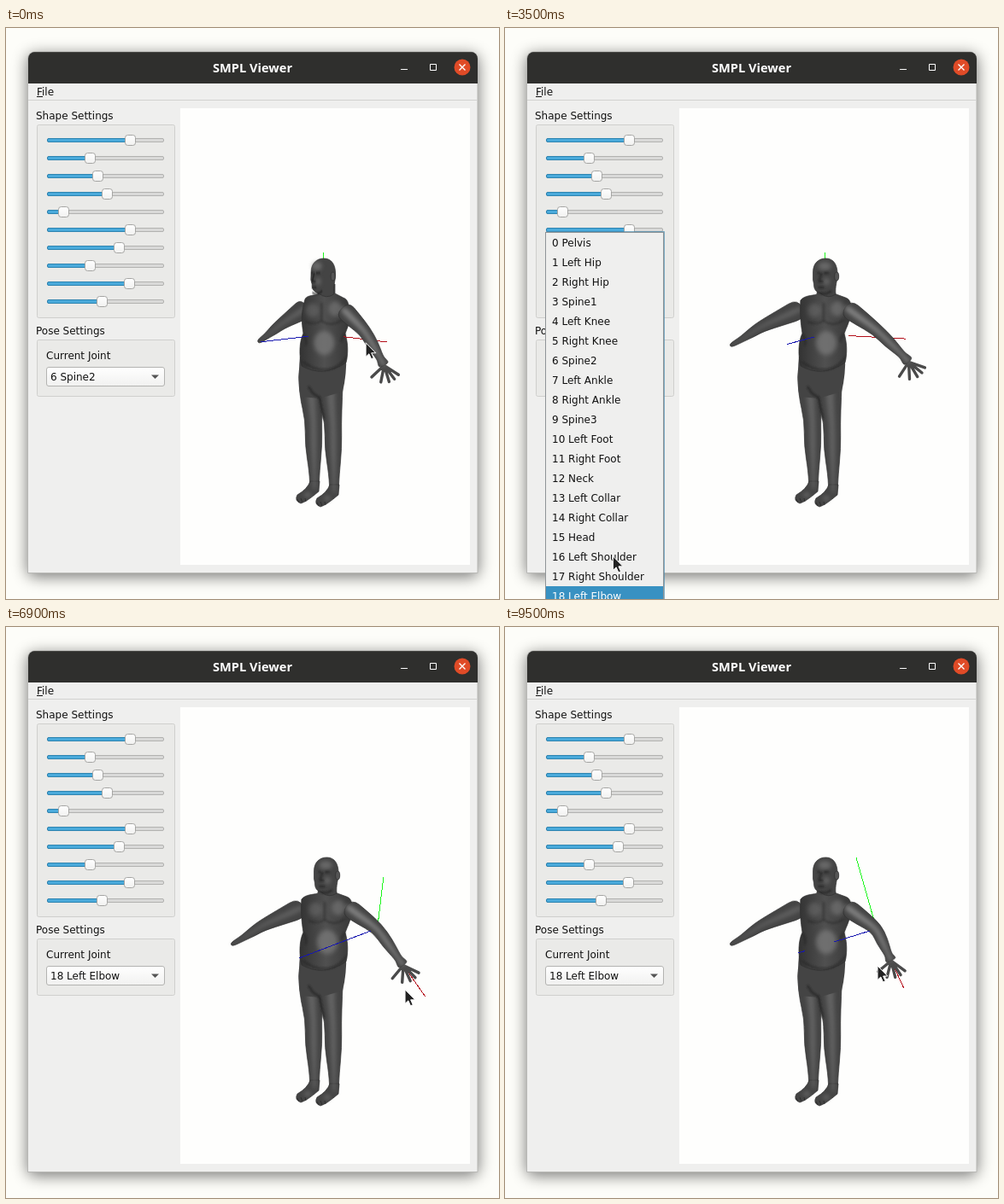
Animation, 577 px wide and 669 px high, one loop 9600 ms. Source, as an HTML page:

```html
<!DOCTYPE html>
<html lang="en">
<head>
<meta charset="utf-8">
<title>SMPL Viewer</title>
<style>
  html, body { margin: 0; width: 100%; height: 100%; overflow: hidden; background: #fdfdf9; }
  svg { display: block; }
  text { font: 12px "DejaVu Sans", sans-serif; fill: #111; white-space: pre; }
  .title { font: bold 14.6px "Noto Sans", sans-serif; fill: #fff; text-anchor: middle; }
  .box { fill: #eaeae8; stroke: #cfcfcd; }
  .axis { fill: none; shape-rendering: crispEdges; }
  .skin { fill: #444; stroke: #303030; stroke-width: .7; stroke-linejoin: round; }
  .light { fill: #808080; filter: url(#soft); }
  .dark { fill: none; stroke: #262626; stroke-width: 2; filter: url(#fine); }
  .fingers { fill: none; stroke: #4a4a4a; stroke-width: 3.4; stroke-linecap: round; }
</style>
</head>
<body>
<svg width="577" height="669" viewBox="0 0 577 669">
  <defs>
    <filter id="shadow" x="-10%" y="-10%" width="120%" height="120%"><feGaussianBlur stdDeviation="9"/></filter>
    <filter id="soft" x="-60%" y="-60%" width="220%" height="220%"><feGaussianBlur stdDeviation="2.6"/></filter>
    <filter id="fine" x="-40%" y="-40%" width="180%" height="180%"><feGaussianBlur stdDeviation=".9"/></filter>
    <linearGradient id="button" x2="0" y2="1"><stop stop-color="#fff"/><stop offset="1" stop-color="#f1f1f0"/></linearGradient>
    <linearGradient id="torsoFill"><stop stop-color="#333"/><stop offset=".5" stop-color="#505050"/><stop offset="1" stop-color="#383838"/></linearGradient>
  </defs>

  <rect width="577" height="669" fill="#fdfdf9"/>
  <rect x="25" y="31" width="528" height="612" rx="8" fill="#000" opacity=".52" filter="url(#shadow)"/>
  <path d="M25.5 638.5V36a8 8 0 0 1 8-8H544a8 8 0 0 1 8 8V638.5Z" fill="#efefee" stroke="#b8b8b5"/>
  <path d="M26 65V36a8 8 0 0 1 8-8H544a8 8 0 0 1 8 8V65Z" fill="#2f2f2d"/>
  <path d="M33 28.5H545" stroke="#464643"/>
  <text class="title" x="288.5" y="52">SMPL Viewer</text>
  <path d="M462 48.5H470M496.5 42.5H503.5V49.5H496.5Z" fill="none" stroke="#fff"/>
  <circle cx="534" cy="46" r="9.5" fill="#e04b27"/>
  <path d="M530.5 42.5L537.5 49.5M537.5 42.5L530.5 49.5" stroke="#fff" stroke-width="1.4"/>
  <text x="36" y="79">File</text>
  <path d="M36 80.5H43" stroke="#111"/>
  <path d="M26 84.5H552" stroke="#d2d2d0"/>
  <rect x="204" y="94" width="339" height="535" fill="#fefefd"/>

  <text x="35" y="107">Shape Settings</text>
  <rect class="box" x="36.5" y="113.5" width="161" height="226" rx="2"/>
  <g id="sliders"></g>
  <text x="35" y="359">Pose Settings</text>
  <rect class="box" x="36.5" y="365.5" width="161" height="66" rx="2"/>
  <text x="47" y="388">Current Joint</text>
  <rect x="47.5" y="397.5" width="138" height="22" rx="2.5" fill="url(#button)" stroke="#b3b3b1"/>
  <text id="joint" x="52" y="413"></text>
  <path d="M170 406.5H179L174.5 411Z" fill="#555"/>

  <path id="green" class="axis" stroke="#1cf51c"/>
  <path id="rightArm" class="skin"/>
  <path id="rightShine" class="light" opacity=".45"/>
  <g id="legs"></g>
  <path class="skin" stroke="none" style="stroke:none" d="M344 385Q341 420 345 432L367 434L394 426Q399 405 398 385Z"/>
  <path class="dark" d="M354 420Q359 429 367 433Q370 448 372 458"/>

  <path id="torso" class="skin" style="fill:url(#torsoFill)"/>
  <g id="chest">
    <g class="light">
      <ellipse cx="376" cy="369" rx="12" ry="14" opacity=".65"/>
      <ellipse cx="362" cy="331" rx="8" ry="8" opacity=".35"/>
      <ellipse cx="389" cy="329" rx="8" ry="9" opacity=".55"/>
    </g>
    <path class="dark" opacity=".55" d="M354 344Q364 349 373 343Q384 351 397 342M373 322V343"/>
  </g>
  <path class="dark" opacity=".7" d="M347 391Q366 405 384 398Q394 394 398 386M348 359Q353 365 351 372M397 358Q392 363 393 368"/>

  <path id="head" class="skin"/>
  <g id="face">
    <ellipse class="light" cx="4" cy="279" rx="8" ry="5" opacity=".6"/>
    <ellipse class="light" cx="6" cy="297" rx="4" ry="4" opacity=".55"/>
    <path class="dark" d="M-5 287H-2M3 287H9M-4 304H3M0 287L-3 297H2M-3 310Q4 314 12 308"/>
  </g>
  <ellipse id="ear" cy="291" rx="2.5" ry="5" fill="#555" stroke="#303030" stroke-width=".8"/>

  <path id="red" class="axis" stroke="#b30d18"/>
  <path id="fingers" class="fingers"/>
  <path id="leftArm" class="skin"/>
  <path id="leftShine" class="light"/>
  <path id="blue" class="axis" stroke="#1717b0"/>

  <g id="popup">
    <rect x="47.5" y="239.5" width="138" height="440" fill="#efefee" stroke="#8f9497"/>
    <path d="M48 238.5H186.5V669" fill="none" stroke="#4c8fb3" opacity=".7"/>
    <rect id="marker" x="48" width="137" height="23" fill="#3891c2"/>
    <g id="items"></g>
  </g>
  <path id="cursor" d="M0 0V16.5L3.8 13L6.5 19L9.2 17.8L6.6 12H11.8Z" fill="#222" stroke="#fff"/>
</svg>

<script>
const el = id => document.getElementById(id);
const set = (id, attrs) => { for (const k in attrs) el(id).setAttribute(k, attrs[k]); };
const LOOP = 9600, STEP = 100, RAD = Math.PI / 180;
const joints = ["Pelvis", "Left Hip", "Right Hip", "Spine1", "Left Knee", "Right Knee", "Spine2",
  "Left Ankle", "Right Ankle", "Spine3", "Left Foot", "Right Foot", "Neck", "Left Collar",
  "Right Collar", "Head", "Left Shoulder", "Right Shoulder", "Left Elbow"].map((name, i) => `${i} ${name}`);

const clamp = v => Math.min(1, Math.max(0, v));
const ease = v => v * v * (3 - 2 * v);
const progress = (t, from, to) => ease(clamp((t - from) / (to - from)));
const mix = (a, b, k) => Array.isArray(a) ? a.map((v, i) => mix(v, b[i], k)) : a + (b - a) * k;

// Eases from key to key; each key is [time, value].
const sample = (track, t) => track.slice(1).reduce(
  (value, [time, next], i) => mix(value, next, progress(t, track[i][0], time)), track[0][1]);

function limb(joints, widths, scale = 1) {
  const left = [], right = [], last = joints.length - 1;
  joints.forEach(([x, y], i) => {
    const [px, py] = joints[Math.max(0, i - 1)], [qx, qy] = joints[Math.min(last, i + 1)];
    const dx = qx - px, dy = qy - py, r = widths[i] * scale / 2 / Math.hypot(dx, dy);
    left.push([x - dy * r, y + dx * r]);
    right.unshift([x + dy * r, y - dx * r]);
  });
  const pts = [...left, ...right];
  return `M${mix(pts[pts.length - 1], pts[0], .5)}` +
    pts.map((p, i) => `Q${p} ${mix(p, pts[(i + 1) % pts.length], .5)}`).join("") + "Z";
}
const subdivide = pts => pts.flatMap((p, i) => i ? [mix(pts[i - 1], p, .5), p] : [p]);
const line = (a, b) => `M${a}L${b}`;

el("sliders").innerHTML = [145, 98, 107, 118, 67, 145, 132, 98, 144, 112].map((x, i) => {
  const y = 131 + 21 * i;
  const groove = (width, fill, stroke) =>
    `<rect x="48.5" y="${y - 1.5}" width="${width}" height="4" rx="1.5" fill="${fill}" stroke="${stroke}"/>`;
  return groove(136, "#d9d9d8", "#b2b2b0") + groove(x - 50, "#4aaadb", "#2e84b0") +
    `<rect x="${x - 5.5}" y="${y - 5.5}" width="12" height="12" rx="3" fill="url(#button)" stroke="#a5a5a3"/>`;
}).join("");
el("items").innerHTML = joints.map((name, i) => `<text x="55" y="${256 + 23 * i}">${name}</text>`).join("");

const legJoints = [[357, 390], [357, 430], [360, 460], [360, 488], [361, 520], [361, 542]];
const legWidths = [30, 27, 19, 20, 12, 10];
el("legs").innerHTML = [[0, 0], [23, 4]].map(([dx, dy]) => `<g transform="translate(${dx} ${dy})">
  <path class="skin" d="${limb(legJoints, legWidths)}"/>
  <path class="skin" d="M356 531Q353 540 341 547Q337 554 345 557Q352 555 366 543L367 531Z"/>
  <path class="light" opacity=".5" d="${limb(legJoints, legWidths, .35)}"/>
  <ellipse class="light" cx="353" cy="547" rx="4" ry="3" opacity=".5"/>
  <path d="M341 552l2 4M345 551l2 5M350 551l1 4" stroke="#292929" stroke-width=".8"/></g>`).join("");

// The upper body turns about a vertical axis, seen slightly from above.
const project = yaw => ([x, y, z]) => {
  const c = Math.cos(yaw * RAD), s = Math.sin(yaw * RAD);
  return [373 + x * c - z * s, y + .12 * (x * s + z * c)];
};
const leftJoints = [[27, 326, -2], [67, 350, -1], [106, 376, 13], [116, 384, 16]];
const rightJoints = [[-26, 329, 3], [-85, 355, -12], [-110, 371, -13], [-126, 380, -14]];
const leftWidths = [22, 19, 14, 14, 8, 11, 13], rightWidths = [25, 19, 13, 11, 7, 6, 4];
const AXIS = 105, OPEN = 24, TURNED = 55.4;

function drawHand([x, y], angle) {
  return [60, 24, -4, -24, -44].map(spread => {
    const a = (angle + 15 + spread) * RAD, r = 20;
    return line([x, y], [x + r * Math.cos(a), y + r * Math.sin(a)]);
  }).join("");
}

function drawBody(yaw, elbowPose) {
  const at = project(yaw), s = Math.sin(yaw * RAD);
  const left = leftJoints.map(at), elbow = left[1];
  const skull = 379 - 11 * s, nose = skull - 20 * s, face = skull - 14, back = skull + 14.5;
  const xl = 341 + 12 * s, xr = 410 - 13 * s;

  if (elbowPose) {
    const [hand, up] = elbowPose, lean = clamp((442 - up[0]) / 30);
    left[2] = mix(elbow, hand, .8);
    left[3] = hand;
    const start = [427, 356], tip = [343, 388 - 6 * lean];
    set("red", { d: line(elbow, mix(elbow, hand, 1.85)) });
    set("green", { d: line(elbow, up) });
    // A leaning forearm sinks the middle of this axis into the belly.
    set("blue", { d: line(start, mix(start, tip, .7 - .2 * lean)) + line(mix(start, tip, .7 + .2 * lean), tip) });
  } else {
    const origin = at([0, 359, 0]), x = at([AXIS, 359, 0]), z = at([0, 359, AXIS]);
    set("red", { d: line(mix(origin, x, .3), x) });
    set("green", { d: line([skull, 272], [skull, 263]) });
    set("blue", { d: line(mix(origin, z, .25), z) });
  }

  const leftArm = subdivide(left), rightArm = subdivide(rightJoints.map(at));
  const [wrist, hand] = left.slice(2);
  set("leftArm", { d: limb(leftArm, leftWidths) });
  set("leftShine", { d: limb(leftArm, leftWidths, .35) });
  set("rightArm", { d: limb(rightArm, rightWidths) });
  set("rightShine", { d: limb(rightArm, rightWidths, .3) });
  set("fingers", { d: drawHand(hand, Math.atan2(hand[1] - wrist[1], hand[0] - wrist[0]) / RAD) });
  set("torso", { d: `M366 302L365 312C358 314 351 313 ${xl} 319C345 335 346 345 348 358C343 367 343 385 346 396Q371 410 398 392C401 380 400 368 397 358C400 350 403 345 ${xr - 1} 338C${xr + 2} 325 ${xr} 318 ${xr - 6} 316L385 311V300Z` });
  set("head", { d: `M${face} 286C${face} 276 ${face + 6} 270 ${skull + 1} 270C${back - 4} 270 ${back} 278 ${back} 288C${back} 297 ${back - 3} 302 ${back - 2} 312Q${back - 11} 318 ${face + 9} 311C${face + 3} 309 ${face + 1} 306 ${face + 1} 300L${Math.min(face, nose)} 295Z` });
  set("face", { transform: `translate(${nose + 4} 0) scale(${1.2 - .6 * s} 1)` });
  set("ear", { cx: back + 2 - 7 * s });
  set("chest", { transform: `translate(${5 - 12 * s} 0)` });
}

const yawTrack = [[0, 45.7], [500, 13], [1100, TURNED], [1300, TURNED], [1900, OPEN]];

// Elbow poses: hand, end of the up axis, pointer.
const rest = [[473, 391], [456, 288], [481, 411]];
const bent = [[451, 394], [413, 277], [447, 408]];
const low = [[464, 403], [442, 305], [463, 447]];
const raised = [[452, 391], [411, 270], [436, 397]];
const wide = mix(low, rest, .5);
const elbowTrack = [[5500, rest], [6000, bent], [6400, bent], [7100, wide], [7800, low], [8400, bent], [9500, raised]];

const combo = [148, 404], listEnd = [121, 672];
function pointer(t, yaw, elbowPose) {
  if (t >= 5200) return elbowPose[2];
  if (t >= 4400) return mix(listEnd, rest[2], progress(t, 4400, 5200));
  if (t >= 2500) return mix(combo, listEnd, progress(t, 3200, 3620));
  const turn = (yaw - OPEN) / (TURNED - OPEN);
  return mix([431 - 30 * turn ** 3, 366 + 4 * turn], combo, progress(t, 2300, 2500));
}

function draw(time) {
  const t = Math.floor(time % LOOP / STEP) * STEP;
  const yaw = sample(yawTrack, t), elbowPose = t >= 4500 && sample(elbowTrack, t);
  drawBody(yaw, elbowPose);
  set("cursor", { transform: `translate(${pointer(t, yaw, elbowPose)})` });
  el("joint").textContent = joints[elbowPose ? 18 : 6];
  const row = 6 + Math.round(12 * clamp(1.25 * progress(t, 3200, 3620)));
  set("popup", { display: t >= 2900 && t < 4500 ? "inline" : "none" });
  set("marker", { y: 240 + 23 * row });
  [...el("items").children].forEach((item, i) => { item.style.fill = i === row ? "#fff" : "#111"; });
}

const start = performance.now();
function tick() {
  draw(performance.now() - start);
  requestAnimationFrame(tick);
}
tick();
</script>
</body>
</html>
```
